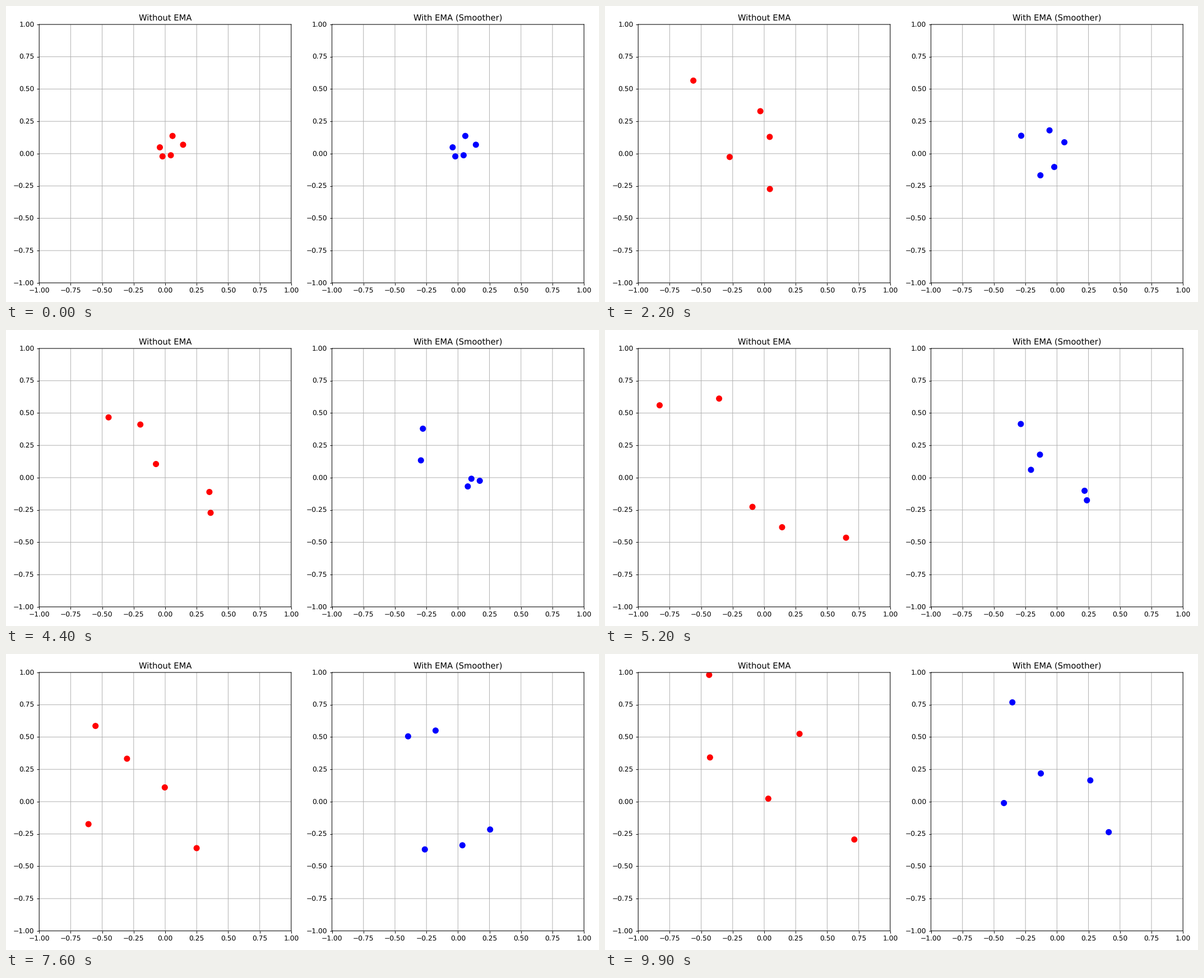
These frames come from a looping animation (1058x529 px, 10 s). A matplotlib script:

```python
import numpy as np
import matplotlib.pyplot as plt
from matplotlib.animation import FuncAnimation

FRAMES = 100
INTERVAL = 100
POINTS = 5
STEP = 0.09
ALPHA = 0.05
LAYOUT_DPI = 100
STAGE_DPI = 88.1667  # 12 x 6 inches -> 1058 x 529 pixels


def random_walk():
    rng = np.random.RandomState(42)
    steps = rng.randn(FRAMES, POINTS, 2) * STEP
    return np.cumsum(steps, axis=0)


def smooth(path):
    """Exponential moving average along the time axis."""
    out = path.copy()
    for i in range(1, len(path)):
        out[i] = (1 - ALPHA) * out[i - 1] + ALPHA * path[i]
    return out


def make_panel(ax, title, color, start):
    ax.set_title(title)
    ax.set_xlim(-1, 1)
    ax.set_ylim(-1, 1)
    ax.grid(True)
    # One size per dot keeps their sub-pixel positions.
    return ax.scatter(start[:, 0], start[:, 1], s=[64] * POINTS,
                      c=color, linewidths=1, zorder=2)


walk = random_walk()
paths = [walk, smooth(walk)]

plt.rcParams["font.family"] = "DejaVu Sans"
fig, axes = plt.subplots(1, 2, figsize=(12, 6), dpi=LAYOUT_DPI)
panels = [
    make_panel(axes[0], "Without EMA", "red", paths[0][0]),
    make_panel(axes[1], "With EMA (Smoother)", "blue", paths[1][0]),
]
fig.tight_layout()
fig.set_dpi(STAGE_DPI)

# Soft, unsnapped lines and unhinted text at the stage's resolution.
plt.rcParams["text.hinting"] = "no_hinting"
for ax in axes:
    for line in [*ax.spines.values(), *ax.get_xgridlines(), *ax.get_ygridlines()]:
        line.set_snap(False)


def update(frame):
    for dots, path in zip(panels, paths):
        dots.set_offsets(path[frame])
    return panels


anim = FuncAnimation(fig, update, frames=FRAMES, interval=INTERVAL,
                     repeat=True, repeat_delay=0, blit=False)
plt.show()
```
